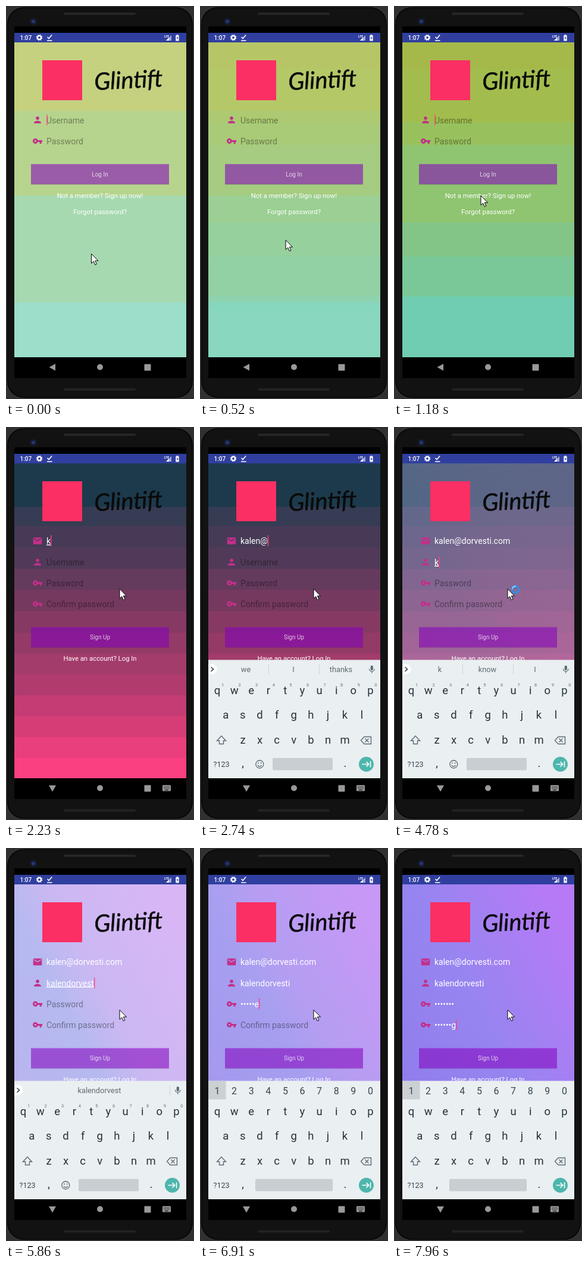
Write an HTML page that moves like this. It is 316x659 px and loops after 8000 ms.

```html
<!DOCTYPE html>
<html lang="en">
<head>
<meta charset="utf-8">
<title>Sign-up screen</title>
<style>
html, body { margin: 0; width: 100%; height: 100%; overflow: hidden; background: #000; }
svg { display: block; width: 100vw; height: 100vh; }
text { font-family: Roboto, "Open Sans", sans-serif; }
.field { font-size: 14px; fill: #fff; }
.hint { font-size: 14px; fill: #000; fill-opacity: .4; }
.link { font-size: 11.3px; fill: #fff; text-anchor: middle; }
.label { font-size: 10px; fill: #fff; fill-opacity: .75; text-anchor: middle; }
.key { font-size: 18.5px; fill: #263238; text-anchor: middle; }
.sup { font-size: 7.5px; fill: #65737a; text-anchor: middle; }
.digit { font-size: 16px; fill: #37474f; text-anchor: middle; }
.word { font-size: 12.8px; fill: #5d6b72; text-anchor: middle; }
.mark { font: italic 40px Lato, "Open Sans", cursive; fill: #0a0a0a; stroke: #0a0a0a; stroke-width: .5; }
</style>
</head>
<body>
<svg viewBox="0 0 316 659" preserveAspectRatio="none">
  <defs>
    <clipPath id="screen"><rect x="14" y="61" width="289" height="528"/></clipPath>
    <linearGradient id="lilac" x1="0" y1=".75" x2=".8" y2="0">
      <stop offset="0" stop-color="#b9b4ee"/><stop offset=".42" stop-color="#b6b9f0"/>
      <stop offset=".6" stop-color="#cbb8f2"/><stop offset="1" stop-color="#d8b6f6"/>
    </linearGradient>
    <linearGradient id="violet" x1="0" y1=".75" x2=".8" y2="0">
      <stop offset="0" stop-color="#907cec"/><stop offset=".5" stop-color="#9685f0"/>
      <stop offset="1" stop-color="#b67af6"/>
    </linearGradient>
    <path id="person" d="M12 12c2.2 0 4-1.8 4-4s-1.8-4-4-4-4 1.8-4 4 1.8 4 4 4zm0 2c-2.7 0-8 1.3-8 4v2h16v-2c0-2.7-5.3-4-8-4z"/>
    <path id="lock" d="M12.65 10C11.8 7.7 9.6 6 7 6c-3.3 0-6 2.7-6 6s2.7 6 6 6c2.6 0 4.8-1.7 5.65-4H17v4h4v-4h2v-4zM7 14c-1.1 0-2-.9-2-2s.9-2 2-2 2 .9 2 2-.9 2-2 2z"/>
    <path id="mail" d="M20 4H4c-1.1 0-2 .9-2 2v12c0 1.1.9 2 2 2h16c1.1 0 2-.9 2-2V6c0-1.1-.9-2-2-2zm0 4l-8 5-8-5V6l8 5 8-5z"/>
    <g id="brand">
      <rect x="61" y="91" width="67" height="67" fill="#fb2f63"/>
      <text class="mark" transform="translate(149 141) rotate(-3)">Glintift</text>
    </g>
  </defs>

  <rect width="316" height="659" fill="#303030"/>
  <rect x="1" y="1" width="314" height="657" rx="29" fill="#0b0b0b" stroke="#414141"/>
  <rect x="4" y="4" width="308" height="651" rx="26" fill="#121212"/>
  <rect x="14" y="34" width="289" height="590" fill="#000"/>
  <rect x="97" y="11" width="121" height="4" rx="2" fill="#262626"/>
  <rect x="97" y="641" width="121" height="4" rx="2" fill="#222"/>
  <circle cx="46" cy="26" r="6" fill="#151a30"/><circle cx="46" cy="26" r="3" fill="#26356f"/>

  <rect x="14" y="45" width="289" height="16.5" fill="#303f9f"/>
  <g fill="none" stroke="#fff">
    <circle cx="56" cy="53" r="3" stroke-width="2.2"/>
    <circle cx="56" cy="53" r="4.6" stroke-width="1.4" stroke-dasharray="1.8 1.81"/>
    <path d="M69.5 52l2.5 2.6 5.2-6M69 58h8.5" stroke-width="1.6"/>
  </g>
  <text x="23.5" y="57" font-size="10" font-weight="500" fill="#fff">1:07</text>
  <text x="266" y="52.5" font-size="5" font-weight="700" fill="#fff">LTE</text>
  <path d="M269 58L278 49V58z" fill="#fff" fill-opacity=".55"/><path d="M269 58l5-5v5z" fill="#fff"/>
  <path d="M285.3 49.2h1.5V48h2.4v1.2h1.5V58.500h-5.400z" fill="#fff"/>
  <path d="M288.500 50.500l-1.900 3.500h1.300v2.800l1.900-3.600h-1.300z" fill="#303f9f"/>

  <g clip-path="url(#screen)">
    <g id="login"></g>
    <g id="signup"></g>
    <g id="board"></g>
  </g>

  <g fill="#999">
    <path id="back"/>
    <circle cx="158" cy="605.500" r="5"/>
    <rect x="232.500" y="600.500" width="11" height="11" rx="1"/>
    <g id="kbIcon">
      <rect x="263" y="600.500" width="14" height="10" rx="1"/>
      <path d="M265 603.500h10M265 606h10" stroke="#000" stroke-width="1.200" stroke-dasharray="1.300 .9"/>
      <path d="M267 608.700h6" stroke="#000"/>
    </g>
  </g>

  <g id="pointer">
    <path d="M0 0V16L3.700 12.600 6.300 18.500 8.900 17.400 6.300 11.700H11.500z" fill="#fff" stroke="#000"/>
    <circle id="busy" cx="13" cy="1" r="5.500" fill="none" stroke="#2a8fe6" stroke-width="3.400"/>
    <path id="spin" d="M13-4.500A5.500 5.500 0 0 1 18.500 1" fill="none" stroke="#8fd0ff" stroke-width="2"/>
  </g>
</svg>

<script>
const LOOP = 8000;
const $ = id => document.getElementById(id);
const clamp = x => Math.max(0, Math.min(1, x));
const span = (t, a, b) => clamp((t - a) / (b - a));
const ease = x => x * x * (3 - 2 * x);
const mix = (a, b, k) => a + (b - a) * k;
const show = (el, on) => el.setAttribute('display', on ? 'inline' : 'none');

const EMAIL = 'kalen@dorvesti.com', USER = 'kalendorvest' + 'i', PASS = 'mapleeg';

// stacked colour bands: each entry is [top, colour]
const bands = list => list.map(([y, c], i) => {
  const end = i + 1 < list.length ? list[i + 1][0] : 590;
  return `<rect x="14" y="${y}" width="289" height="${end - y}" fill="${c}" shape-rendering="crispEdges"/>`;
}).join('');

const fill = (id, paint) =>
  `<rect id="${id}" x="14" y="61" width="289" height="529" fill="${paint}"/>`;
const icon = (name, y) =>
  `<use href="#${name}" fill="#c2308a" transform="translate(53 ${y}) scale(.73) translate(-12 -12)"/>`;
const button = (y, label) =>
  `<rect x="42" y="${y + 1}" width="232" height="34" fill="#000" fill-opacity=".12"/>
   <rect x="42" y="${y}" width="232" height="34" fill="#9400d3" fill-opacity=".5"/>
   <text class="label" x="158" y="${y + 20.5}">${label}</text>`;
const link = (y, s) => `<text class="link" x="158" y="${y}">${s}</text>`;
const hint = (y, s, id) => `<text class="hint" id="${id}" x="68" y="${y + 5}">${s}</text>`;

$('login').innerHTML =
  bands([[61, '#c5d17f'], [176, '#b7d48e'], [318, '#a6d9b0'], [497, '#9bdec9']]) +
  `<g id="vivid">${bands([[61, '#a5b94a'], [106, '#a2bd4d'], [195, '#98c15e'], [233, '#8fc470'],
    [363, '#82c586'], [420, '#7ac897'], [487, '#70cdb1']])}</g>` +
  '<use href="#brand"/>' + icon('person', 191) + icon('lock', 226.5) +
  hint(191.5, 'Username', 'h0') + hint(226.5, 'Password', 'h1') +
  '<rect id="loginCaret" x="68.3" y="182" width="1.3" height="18" fill="#ff4081"/>' +
  button(265, 'Log In') + link(322, 'Not a member? Sign up now!') + link(348.7, 'Forgot password?');

const rows = [
  { y: 191, icon: 'mail', hint: 'Email', text: EMAIL, from: 2200, step: 108, focus: 0 },
  { y: 226.5, icon: 'person', hint: 'Username', text: USER, from: 4740, step: 98, focus: 4400 },
  { y: 261.5, icon: 'lock', hint: 'Password', text: PASS, from: 6450, step: 80, focus: 6150, secret: true },
  { y: 296.5, icon: 'lock', hint: 'Confirm password', text: PASS, from: 7505, step: 75, focus: 7150, secret: true }
];

$('signup').innerHTML =
  bands([[61, '#1c3a4c'], [134, '#363c53'], [166, '#463a57'], [202, '#513a59'], [238, '#643a5d'],
    [273, '#75395f'], [309, '#863a63'], [345, '#943a67'], [380, '#a33c6b'], [415, '#b23b6e'],
    [450, '#c43c73'], [485, '#d63d77'], [520, '#e93f7c'], [555, '#fb4081']]) +
  fill('lilacBg', 'url(#lilac)') + fill('violetBg', 'url(#violet)') +
  '<use href="#brand"/>' +
  rows.map((r, i) => icon(r.icon, r.y) + hint(r.y, r.hint, 'hint' + i) +
    `<text class="field" x="68" y="${r.y + 5}"><tspan id="head${i}"></tspan><tspan id="tail${i}" text-decoration="underline"></tspan></text>`
  ).join('') +
  '<rect id="caret" width="1.4" height="18.500" fill="#ff4081"/>' +
  button(335.5, 'Sign Up') + link(392.3, 'Have an account? Log In');

const PITCH = 28.6;
const keyRow = (s, x, y, cls) => [...s].map((c, i) =>
  `<text class="${cls}" x="${x + i * PITCH}" y="${y}">${c}</text>`).join('');

$('board').innerHTML = `
  <rect x="14" y="390.5" width="289" height="199" fill="#eaeff1"/>
  <g id="letters">${keyRow('qwertyuiop', 29, 448, 'key')}${keyRow('asdfghjkl', 43.3, 489, 'key')}${keyRow('zxcvbnm', 72, 530.5, 'key')}</g>
  <g fill="none" stroke="#5d6b72" stroke-width="1.4">
    <path d="M36 518l-7.500 8h4v5.500h7v-5.500h4z"/>
    <path d="M276 519.500h11.500v12H276l-5.500-6zM277.500 522.500l6 6m0-6l-6 6"/>
  </g>
  <text class="word" x="36" y="570" style="font-size:12.500px;fill:#37474f">?123</text>
  <text class="key" x="72" y="570">,</text><text class="key" x="244" y="570">.</text>
  <rect id="space" y="555" height="20.5" rx="2" fill="#c8ced1"/>
  <circle cx="279.500" cy="565.500" r="12.500" fill="#4db6ac"/>
  <path d="M272.500 565.500h11M279.500 561.300l4.200 4.200-4.200 4.200M286.500 560.500v10" fill="none" stroke="#fff" stroke-width="1.600"/>
  <g id="plain">
    ${keyRow('1234567890', 38, 434.5, 'sup')}
    <g fill="none" stroke="#5d6b72" stroke-width="1.300">
      <circle cx="100.300" cy="565.500" r="6.500"/><path d="M97 567a3.600 3.600 0 0 0 6.600 0"/>
    </g>
    <circle cx="98" cy="563.500" r="1" fill="#5d6b72"/><circle cx="102.600" cy="563.500" r="1" fill="#5d6b72"/>
    <path d="M14 397.500h6a8.500 8.500 0 0 1 0 17h-6z" fill="#fff"/>
    <path d="M18.500 402.500l4 3.700-4 3.700" fill="none" stroke="#37474f" stroke-width="1.600"/>
    <path id="bars" stroke="#cdd4d7"/>
    <text class="word" id="w0" x="77" y="411"></text>
    <text class="word" id="w1" x="157" y="411"></text>
    <text class="word" id="w2" x="237" y="411"></text>
    <rect x="286.700" y="400" width="4.200" height="8" rx="2.100" fill="#5d6b72"/>
    <path d="M284.500 405.500a4.300 4.300 0 0 0 8.600 0M288.800 410v3" fill="none" stroke="#5d6b72" stroke-width="1.200"/>
  </g>
  <g id="numbers">
    <rect x="14" y="391" width="29.500" height="30.500" fill="#cbd0d3"/>
    ${keyRow('1234567890', 29, 413, 'digit')}
  </g>`;

const keys = [...$('letters').children];

function typed(r, t) {
  const n = Math.max(0, Math.min(r.text.length, Math.floor((t - r.from) / r.step) + 1));
  return r.text.slice(0, n);
}

function drawForm(t) {
  const active = rows.reduce((a, r, i) => t >= r.focus ? i : a, 0);
  let word = '';
  rows.forEach((r, i) => {
    const s = typed(r, t), on = i === active;
    let head = s, tail = '';
    if (r.secret) {
      const open = on && s ? 1 : 0;
      head = '\u2022'.repeat(s.length - open) + s.slice(s.length - open);
    } else if (on) {
      tail = s.match(/[^@.]*$/)[0];
      head = s.slice(0, s.length - tail.length);
      word = tail;
    }
    $('head' + i).textContent = head;
    $('tail' + i).textContent = tail;
    show($('hint' + i), !s);
    if (on) {
      const w = s ? $('head' + i).parentNode.getComputedTextLength() : 0;
      $('caret').setAttribute('x', 68 + w);
      $('caret').setAttribute('y', r.y - 9.5);
    }
  });
  return { word, secret: rows[active].secret };
}

function drawBoard(t, { word, secret }) {
  $('board').setAttribute('transform', `translate(0 ${200 * (1 - ease(span(t, 2290, 2520)))})`);
  show($('board'), t > 2290);
  show($('plain'), !secret);
  show($('numbers'), secret);
  $('space').setAttribute('x', secret ? 93 : 122);
  $('space').setAttribute('width', secret ? 130 : 101);
  const caps = t < 2680;
  keys.forEach(k => {
    const c = k.textContent;
    k.textContent = caps ? c.toUpperCase() : c.toLowerCase();
  });
  const tips = word.length > 1 ? ['', word, ''] : word ? [word, 'know', 'I'] : ['we', 'I', 'thanks'];
  tips.forEach((s, i) => { $('w' + i).textContent = s; });
  $('bars').setAttribute('d', word.length > 1 ? 'M275.5 398v17' : 'M115.5 398v17M200.5 398v17');
}

function drawPointer(t) {
  const a = ease(span(t, 300, 1000)), b = ease(span(t, 1380, 1740));
  const x = mix(mix(143.5, 146, a), 191, b), y = mix(mix(415.5, 318, a), 271.5, b);
  $('pointer').setAttribute('transform', `translate(${x} ${y})`);
  const busy = t > 4480 && t < 5060;
  show($('busy'), busy);
  show($('spin'), busy);
  $('spin').setAttribute('transform', `rotate(${t * .36} 13 1)`);
}

function draw(t) {
  $('vivid').setAttribute('opacity', span(t, 0, 1180));
  show($('loginCaret'), t % 1000 < 500);
  const enter = span(t, 1400, 1640);
  $('signup').setAttribute('opacity', enter);
  $('signup').setAttribute('transform', `translate(0 ${42 * (1 - enter) ** 3})`);
  show($('signup'), enter > 0);
  $('lilacBg').setAttribute('opacity', span(t, 4200, 5860));
  $('violetBg').setAttribute('opacity', span(t, 5860, 7960));
  drawBoard(t, drawForm(t));
  const open = t > 2180;
  $('back').setAttribute('d', open ? 'M72 601H84L78 611.500z' : 'M83 600V611.500L72.500 605.700z');
  show($('kbIcon'), open);
  drawPointer(t);
}

const start = performance.now();
function tick() {
  draw((performance.now() - start) % LOOP);
  requestAnimationFrame(tick);
}
tick();
</script>
</body>
</html>
```
